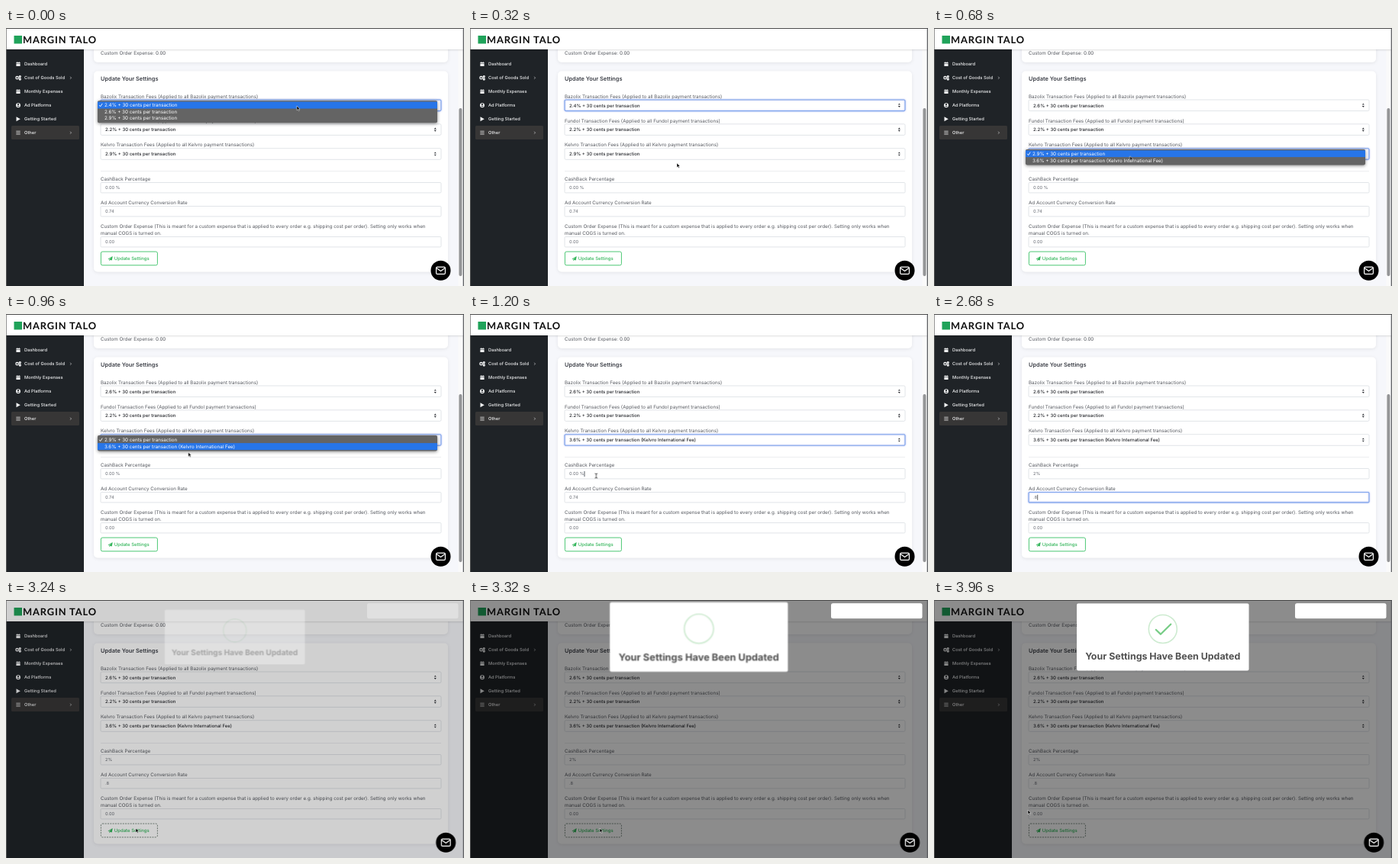
An HTML page for the animation above (4000 ms loop, 600 by 338 pixels).

```html
<!DOCTYPE html>
<html lang="en">
<head>
<meta charset="utf-8">
<title>Fee settings</title>
<style>
html, body { margin: 0; width: 100%; height: 100%; overflow: hidden; background: #f6f7fb; }
svg {
  display: block; width: 100vw; height: 100vh;
  font: 6.26px Inter, "Open Sans", sans-serif;
  text-rendering: geometricPrecision;
}

.label { fill: #55585f; }
.heading { font-size: 7.4px; font-weight: 600; fill: #3b3e46; }
.brand { font: 700 12.8px Lato, sans-serif; letter-spacing: .9px; fill: #0c0c0c; }
.nav { font-size: 5.75px; font-weight: 500; fill: #f0f1f2; }
.icon { fill: #f0f1f2; }
.value { font-size: 6px; font-weight: 500; fill: #24262b; }
.typed { font-size: 5.7px; fill: #666a72; }
.option { fill: #fff; }
.card { fill: #fff; filter: drop-shadow(0 1px 2px #00000014); }
.field { fill: #fff; stroke: #dadde3; stroke-width: .8; }
.focus { fill: none; stroke: #7fa6ee; stroke-width: 1.1; filter: drop-shadow(0 0 1px #7f8df0aa); }
.line { fill: none; stroke-linecap: round; stroke-linejoin: round; }
.menu { filter: drop-shadow(0 1px 2px #0007); }

/* One percent of the loop is 40 ms. */
.move { animation: 4s linear infinite; }
.cut { visibility: hidden; animation: 4s step-end infinite; }

.fee-menu { animation-name: fee-menu; }
.fee-first { animation-name: fee-first; }
.fee-second { animation-name: fee-second; }
.fee-old { animation-name: fee-old; }
.fee-new { animation-name: fee-new; }
.fee-focus { animation-name: fee-focus; }
.card-menu { animation-name: card-menu; }
.card-first { animation-name: card-first; }
.card-second { animation-name: card-second; }
.card-old { animation-name: card-old; }
.card-new { animation-name: card-new; }
.card-focus { animation-name: card-focus; }
.cash-focus { animation-name: cash-focus; }
.cash-caret { animation-name: cash-caret; }
.cash-old { animation-name: cash-old; }
.cash-two { animation-name: cash-two; }
.cash-percent { animation-name: cash-percent; }
.rate-focus { animation-name: rate-focus; }
.rate-old { animation-name: rate-old; }
.rate-dot { animation-name: rate-dot; }
.rate-eight { animation-name: rate-eight; }
.rate-caret { animation-name: rate-caret; }
.arrow { animation-name: arrow; }
.beam { animation-name: beam; }
.button-idle { animation-name: button-idle; }
.button-used { animation-name: button-used; }
.scrollbar { animation-name: scrollbar; }

@keyframes fee-menu { 0% { visibility: visible } 7%, 100% { visibility: hidden } }
@keyframes fee-first { 0% { visibility: visible } 3%, 100% { visibility: hidden } }
@keyframes fee-second { 0% { visibility: hidden } 3% { visibility: visible } 7%, 100% { visibility: hidden } }
@keyframes fee-old { 0% { visibility: visible } 9%, 100% { visibility: hidden } }
@keyframes fee-new { 0% { visibility: hidden } 9%, 100% { visibility: visible } }
@keyframes fee-focus { 0% { visibility: visible } 16%, 100% { visibility: hidden } }
@keyframes card-menu { 0% { visibility: hidden } 16% { visibility: visible } 26%, 100% { visibility: hidden } }
@keyframes card-first { 0% { visibility: hidden } 16% { visibility: visible } 19%, 100% { visibility: hidden } }
@keyframes card-second { 0% { visibility: hidden } 19% { visibility: visible } 26%, 100% { visibility: hidden } }
@keyframes card-old { 0% { visibility: visible } 27%, 100% { visibility: hidden } }
@keyframes card-new { 0% { visibility: hidden } 27%, 100% { visibility: visible } }
@keyframes card-focus { 0% { visibility: hidden } 16% { visibility: visible } 31%, 100% { visibility: hidden } }
@keyframes cash-focus { 0% { visibility: hidden } 31% { visibility: visible } 52%, 100% { visibility: hidden } }
@keyframes cash-caret { 0% { visibility: hidden } 29% { visibility: visible } 31%, 100% { visibility: hidden } }
@keyframes cash-old { 0% { visibility: visible } 37%, 100% { visibility: hidden } }
@keyframes cash-two { 0% { visibility: hidden } 37%, 100% { visibility: visible } }
@keyframes cash-percent { 0% { visibility: hidden } 41%, 100% { visibility: visible } }
@keyframes rate-focus { 0% { visibility: hidden } 52% { visibility: visible } 76%, 100% { visibility: hidden } }
@keyframes rate-old { 0% { visibility: visible } 63%, 100% { visibility: hidden } }
@keyframes rate-dot { 0% { visibility: hidden } 63%, 100% { visibility: visible } }
@keyframes rate-eight { 0% { visibility: hidden } 66%, 100% { visibility: visible } }
@keyframes rate-caret { 0% { visibility: hidden } 66% { visibility: visible } 70%, 100% { visibility: hidden } }
@keyframes arrow { 0% { visibility: visible } 28% { visibility: hidden } 73%, 100% { visibility: visible } }
@keyframes beam { 0% { visibility: hidden } 28% { visibility: visible } 37% { visibility: hidden } 46% { visibility: visible } 63%, 100% { visibility: hidden } }
@keyframes button-idle { 0% { visibility: visible } 77%, 100% { visibility: hidden } }
@keyframes button-used { 0% { visibility: hidden } 77%, 100% { visibility: visible } }
@keyframes scrollbar { 0% { visibility: visible } 80%, 100% { visibility: hidden } }

.pointer { animation-name: pointer; }
@keyframes pointer {
  0% { transform: translate(381px, 102px) }
  3% { transform: translate(374px, 109px) }
  5% { transform: translate(350px, 112px) }
  8% { transform: translate(271px, 177px) }
  14%, 16% { transform: translate(258px, 166px) }
  19% { transform: translate(254px, 171px) }
  22% { transform: translate(246px, 175px) }
  24% { transform: translate(239px, 181px) }
  27% { transform: translate(205px, 201px) }
  30% { transform: translate(166px, 212px) }
  33%, 46% { transform: translate(86px, 212px) }
  51%, 58% { transform: translate(145px, 241px) }
  61%, 72% { transform: translate(105px, 255px) }
  77%, 85% { transform: translate(170px, 299px) }
  97%, 100% { transform: translate(123px, 275px) }
}

.selection { fill: #b5d5fd; transform-box: fill-box; transform-origin: right; }
.cash-select { animation-name: cash-select; }
.rate-select { animation-name: rate-select; }
@keyframes cash-select {
  0%, 30% { transform: scaleX(0) }
  32%, 36.9% { transform: scaleX(1) }
  37%, 100% { transform: scaleX(0) }
}
@keyframes rate-select {
  0%, 58% { transform: scaleX(0) }
  60%, 62.9% { transform: scaleX(1) }
  63%, 100% { transform: scaleX(0) }
}

.shade { animation-name: shade; }
.toast { animation-name: toast; }
.chat { animation: chat 4s step-end infinite; }
.modal { transform-origin: 299.7px 48.5px; animation-name: modal; }
.tick { stroke-dasharray: 1 2; animation-name: tick; }
@keyframes shade { 0%, 80% { opacity: 0 } 82.5%, 100% { opacity: .45 } }
@keyframes toast { 0%, 80% { opacity: 0 } 83%, 100% { opacity: 1 } }
@keyframes chat { 0% { transform: none } 80%, 100% { transform: translateX(6.7px) } }
@keyframes modal {
  0%, 80% { transform: scale(.7); opacity: 0 }
  83% { transform: scale(1.035); opacity: 1 }
  86% { transform: scale(.96) }
  87.5%, 100% { transform: none; opacity: 1 }
}
@keyframes tick {
  0%, 90% { stroke-dashoffset: 1; opacity: 0 }
  90.1% { stroke-dashoffset: 1; opacity: 1 }
  93% { stroke-dashoffset: .68 }
  96%, 100% { stroke-dashoffset: 0; opacity: 1 }
}
</style>
</head>
<body>
<svg viewBox="0 0 600 338" preserveAspectRatio="none">
  <defs>
    <rect id="select" width="446" height="14.6" rx="1.6"/>
    <rect id="input" width="446" height="13.4" rx="1.2"/>
    <path id="arrows" d="M-1.5-.7 0-2.6 1.5-.7zM-1.5.7 0 2.6 1.5.7z" fill="#2b2d33"/>
    <path id="check" class="line" d="M-1.8.1-.6 1.6 1.8-2" stroke="#fff" stroke-width=".9"/>
    <path id="chevron" class="line" d="M-.6-1.2.5 0-.6 1.2" stroke="#d5d6d8" stroke-width=".7"/>
    <g id="calendar" class="icon">
      <path d="M-2.6-2.2h5.2v1.1h-5.2zM-2.6-.6h5.2v3.2h-5.2z"/>
      <path d="M-1.6-3h.8v1h-.8zM.8-3h.8v1H.8z"/>
    </g>
    <path id="plane" d="M-3 .6 3.2-3 2.2 2.6.2 1.8-1 3.2-1.2 1.3 1.8-1.5-2 1z" fill="#2fb457"/>
  </defs>

  <rect width="600" height="338" fill="#f6f7fb"/>
  <rect class="card" x="115" y="10" width="464" height="35" rx="5"/>
  <rect class="card" x="115" y="56.5" width="464" height="263" rx="5"/>
  <text class="label" x="124" y="34.5">Custom Order Expense: 0.00</text>
  <text class="heading" x="124" y="69.3">Update Your Settings</text>

  <g class="label">
    <text x="124" y="91.6">Bazolix Transaction Fees (Applied to all Bazolix payment transactions)</text>
    <text x="124" y="123.5">Fundol Transaction Fees (Applied to all Fundol payment transactions)</text>
    <text x="124" y="155.4">Kelvro Transaction Fees (Applied to all Kelvro payment transactions)</text>
    <text x="124" y="200.4">CashBack Percentage</text>
    <text x="124" y="231.4">Ad Account Currency Conversion Rate</text>
    <text x="124" y="262.4">Custom Order Expense (This is meant for a custom expense that is applied to every order e.g. shipping cost per order). Setting only works when</text>
    <text x="124" y="270.9">manual COGS is turned on.</text>
  </g>
  <path d="M124 187.5H570" stroke="#e8e9ed" stroke-width=".8"/>

  <g class="field">
    <use href="#select" x="124" y="94"/>
    <use href="#select" x="124" y="125.8"/>
    <use href="#select" x="124" y="157.7"/>
    <use href="#input" x="124" y="202.5"/>
    <use href="#input" x="124" y="233.5"/>
    <use href="#input" x="124" y="273.5"/>
  </g>
  <g class="focus">
    <use class="cut fee-focus" href="#select" x="124" y="94"/>
    <use class="cut card-focus" href="#select" x="124" y="157.7"/>
    <use class="cut cash-focus" href="#input" x="124" y="202.5"/>
    <use class="cut rate-focus" href="#input" x="124" y="233.5"/>
  </g>
  <use href="#arrows" x="562.3" y="101.3"/>
  <use href="#arrows" x="562.3" y="133.1"/>
  <use href="#arrows" x="562.3" y="165"/>

  <g class="value">
    <text class="cut fee-old" x="130" y="103.5">2.4% + 30 cents per transaction</text>
    <text class="cut fee-new" x="130" y="103.5">2.6% + 30 cents per transaction</text>
    <text x="130" y="135.3">2.2% + 30 cents per transaction</text>
    <text class="cut card-old" x="130" y="167.2">2.9% + 30 cents per transaction</text>
    <text class="cut card-new" x="130" y="167.2">3.6% + 30 cents per transaction (Kelvro International Fee)</text>
  </g>

  <rect class="selection move cash-select" x="130" y="205" width="20" height="8.4"/>
  <rect class="selection move rate-select" x="130" y="236" width="12" height="8.4"/>
  <g class="typed">
    <text class="cut cash-old" x="130" y="211.3">0.00 %</text>
    <text class="cut cash-two" x="130" y="211.3">2<tspan class="cut cash-percent">%</tspan></text>
    <text class="cut rate-old" x="130" y="242.3">0.74</text>
    <text class="cut rate-dot" x="130" y="242.3">.<tspan class="cut rate-eight">8</tspan></text>
    <text x="130" y="282.3">0.00</text>
  </g>
  <g stroke="#222" stroke-width=".7">
    <path class="cut cash-caret" d="M150 206v7"/>
    <path class="cut rate-caret" d="M135.7 236.8v7"/>
  </g>

  <g fill="#fff">
    <rect class="cut button-idle" x="124.4" y="293" width="74" height="17.8" rx="2" stroke="#4cc774"/>
    <rect class="cut button-used" x="124.4" y="293" width="74" height="17.8" rx="2" stroke="#44594c" stroke-width=".7" stroke-dasharray="2 1.3"/>
  </g>
  <use href="#plane" x="136.5" y="302"/>
  <text x="141.8" y="304.1" font-size="6" font-weight="500" fill="#2fb457">Update Settings</text>

  <g class="cut scrollbar">
    <rect x="592.5" y="28" width="6" height="310" fill="#fafafa"/>
    <rect x="593.4" y="105" width="4" height="220" rx="2" fill="#949597"/>
  </g>

  <rect y="28" width="102" height="310" fill="#1f2327"/>
  <rect x="7" y="128" width="89" height="18" rx="1.5" fill="#373636"/>
  <g class="nav">
    <text x="24" y="49.3">Dashboard</text>
    <text x="24" y="67.3">Cost of Goods Sold</text>
    <text x="24" y="85.3">Monthly Expenses</text>
    <text x="24" y="103.3">Ad Platforms</text>
    <text x="24" y="121.3">Getting Started</text>
    <text x="24" y="139.3">Other</text>
  </g>
  <use href="#calendar" x="16" y="47.3"/>
  <g fill="none" stroke="#f0f1f2" stroke-width="1.3">
    <circle cx="14.6" cy="65.2" r="1.7"/>
    <circle cx="18.3" cy="63.6" r="1"/>
    <circle cx="18.3" cy="67" r="1"/>
  </g>
  <use href="#calendar" x="16" y="83.3"/>
  <circle class="icon" cx="16" cy="101.2" r="3"/>
  <path d="M14.2 103.1q1.8-2.2 3.6 0" fill="#1f2327"/>
  <circle cx="16" cy="100.2" r="1.1" fill="#1f2327"/>
  <path class="icon" d="M13.5 116.2v6l5.3-3z"/>
  <path d="M13.3 135.2h5.4M13.3 137.2h5.4M13.3 139.2h5.4" stroke="#e3e3e3" stroke-width=".8"/>
  <use href="#chevron" x="85" y="65.3"/>
  <use href="#chevron" x="85" y="137.2"/>

  <rect width="600" height="28" fill="#fff" style="filter: drop-shadow(0 1px 1px #0002)"/>
  <rect x="10.5" y="10" width="10.5" height="10.5" fill="#20a35a"/>
  <text class="brand" x="22" y="20.2">MARGIN TALO</text>

  <g class="cut fee-menu menu">
    <rect x="120" y="95.3" width="445" height="29" rx="1.8" fill="#646464"/>
    <rect class="cut fee-first" x="120" y="96.6" width="445" height="9" fill="#2775e8"/>
    <rect class="cut fee-second" x="120" y="105.6" width="445" height="8.6" fill="#2775e8"/>
    <use href="#check" x="124.2" y="101.3"/>
    <g class="option">
      <text x="129" y="103.4">2.4% + 30 cents per transaction</text>
      <text x="129" y="111.9">2.6% + 30 cents per transaction</text>
      <text x="129" y="120.4">2.9% + 30 cents per transaction</text>
    </g>
  </g>
  <g class="cut card-menu menu">
    <rect x="120" y="159" width="445" height="20.4" rx="1.8" fill="#646464"/>
    <rect class="cut card-first" x="120" y="160.3" width="445" height="8.8" fill="#2775e8"/>
    <rect class="cut card-second" x="120" y="169.1" width="445" height="9" fill="#2775e8"/>
    <use href="#check" x="124.2" y="165"/>
    <g class="option">
      <text x="129" y="167.1">2.9% + 30 cents per transaction</text>
      <text x="129" y="175.7">3.6% + 30 cents per transaction (Kelvro International Fee)</text>
    </g>
  </g>

  <rect class="move shade" width="600" height="338"/>
  <rect class="move toast" x="473" y="4.3" width="119.5" height="20" rx="2.5" fill="#fff"/>
  <g class="move modal">
    <rect x="187" y="4.5" width="225.5" height="88" rx="2" fill="#fff"/>
    <circle cx="299.8" cy="38" r="18.5" fill="none" stroke="#cdebd0" stroke-width="1.6"/>
    <path class="line move tick" pathLength="1" d="M290.8 39l6.2 5.8 13.2-13" stroke="#78cd87" stroke-width="2.3"/>
    <text x="299.7" y="78.2" text-anchor="middle" font-size="12.4" font-weight="700" fill="#515151">Your Settings Have Been Updated</text>
  </g>

  <g class="chat">
    <circle cx="569.5" cy="317.8" r="13"/>
    <rect x="563.6" y="313.1" width="11.8" height="9.2" rx="1.4" fill="none" stroke="#fff" stroke-width="1.2"/>
    <path class="line" d="M564.4 314.8l5.1 3.7 5.1-3.7" stroke="#fff" stroke-width="1.2"/>
  </g>

  <g class="move pointer">
    <path class="cut arrow" d="M0 0v5.7l1.4-1.2 1 2.1 1-.5-1-2h1.7z" stroke="#fff" stroke-width=".5"/>
    <path class="cut beam line" d="M-1.3-3q1.3 0 1.3.8 0-.8 1.3-.8M0-2.2v4.4M-1.3 3q1.3 0 1.3-.8 0 .8 1.3.8" stroke="#222" stroke-width=".8"/>
  </g>

  <path d="M0 .5H600" stroke="#4b4b4b"/>
  <path d="M.4 0V338" stroke="#6a6a6a" stroke-width=".8"/>
  <path d="M599.3 0V338" stroke="#55565a" stroke-width="1.2"/>
</svg>
</body>
</html>
```
